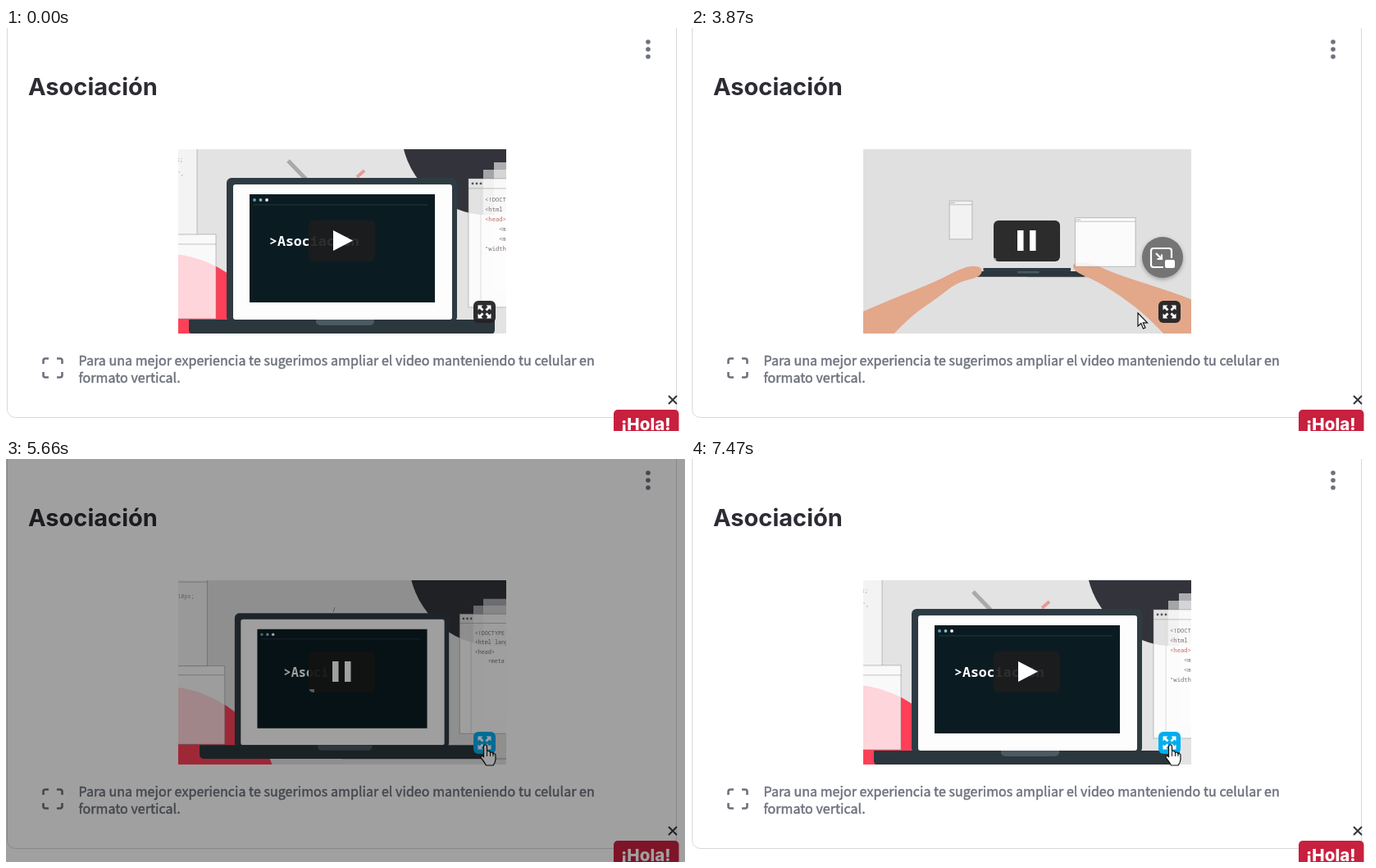
An HTML page with a canvas for the animation above (8 s loop, 828x492 px).

```html
<!DOCTYPE html>
<html lang="es">
<head>
<meta charset="utf-8">
<style>
html, body { margin: 0; width: 828px; height: 492px; overflow: hidden; background: #fff; }
svg, canvas { position: absolute; left: 0; top: 0; }
</style>
</head>
<body>
<svg width="828" height="492" fill="none">
  <rect x="1.5" y="-20.5" width="816" height="496" rx="10" stroke="#d5d7dc"/>
  <g fill="#6d717d">
    <circle cx="783" cy="17" r="2.800"/><circle cx="783" cy="26" r="2.800"/><circle cx="783" cy="35" r="2.800"/>
    <g font-family="'Noto Sans CJK JP','Noto Sans CJK SC','Noto Sans CJK',sans-serif" font-size="16" font-weight="500" letter-spacing=".050" stroke="#6d717d" stroke-width=".450">
      <text x="88.500" y="412">Para una mejor experiencia te sugerimos ampliar el video manteniendo tu celular en</text>
      <text x="88.500" y="433">formato vertical.</text>
    </g>
  </g>
  <text x="27" y="81.500" fill="#2c2c34" font-family="Inter,sans-serif" font-size="29" font-weight="700">Asociación</text>
  <path d="M45.500 410v-4q0-2.500 2.500-2.500h4M62 403.500h4q2.500 0 2.500 2.500v4M68.500 420v4q0 2.500-2.500 2.500h-4M52 426.500h-4q-2.500 0-2.500-2.500v-4" stroke="#6d717d" stroke-width="2.600"/>
  <path d="M808 449l10 10m0-10l-10 10" stroke="#34343c" stroke-width="2"/>
  <rect x="741" y="466" width="79.500" height="40" rx="5" fill="#c8203f"/>
  <text x="750" y="491" fill="#fff" font-family="Inter,sans-serif" font-size="20.500" font-weight="800">¡Hola!</text>
</svg>
<canvas id="stage" width="828" height="492"></canvas>
<script>
const c = document.getElementById('stage').getContext('2d');
const LOOP = 8000, MONO = '"Noto Sans Mono", monospace';
const BLUE = '#00adef', DARK = 'rgba(29,29,29,.92)', SKIN = '#e3a78a', EDGE = 'rgba(125,125,125,.45)';

const ramp = (t, a, b) => Math.max(0, Math.min(1, (t - a) / (b - a)));
const ease = (t, a, b) => { const u = ramp(t, a, b); return u * u * (3 - 2 * u); };
const mix = (a, b, u) => a + (b - a) * u;

// Value of a keyed track [[time, ...values], ...]
function track(keys, t) {
  const i = keys.findIndex(k => k[0] > t);
  if (i === 0) return keys[0].slice(1);
  if (i < 0) return keys[keys.length - 1].slice(1);
  const a = keys[i - 1], b = keys[i], u = ease(t, a[0], b[0]);
  return a.slice(1).map((v, j) => mix(v, b[j + 1], u));
}

function rect(x, y, w, h, fill, r = 0) {
  c.fillStyle = fill;
  c.beginPath();
  c.roundRect(x, y, w, h, r);
  c.fill();
}
function disc(x, y, r, fill) {
  c.fillStyle = fill;
  c.beginPath();
  c.arc(x, y, r, 0, 7);
  c.fill();
}
function line(x1, y1, x2, y2, color, w) {
  c.strokeStyle = color;
  c.lineWidth = w;
  c.beginPath();
  c.moveTo(x1, y1);
  c.lineTo(x2, y2);
  c.stroke();
}
function text(s, x, y, font, color, align = 'left') {
  c.font = font;
  c.fillStyle = color;
  c.textAlign = align;
  c.fillText(s, x, y);
}
function at(x, y, draw, k = 1) {
  c.save();
  c.translate(x, y);
  c.scale(k, k);
  draw();
  c.restore();
}

// Smooth closed outline through midpoints of flat x,y pairs
function blob(p, fill) {
  const n = p.length / 2, X = i => p[(i % n) * 2], Y = i => p[(i % n) * 2 + 1];
  c.fillStyle = fill;
  c.beginPath();
  c.moveTo((X(0) + X(1)) / 2, (Y(0) + Y(1)) / 2);
  for (let i = 1; i <= n; i++) c.quadraticCurveTo(X(i), Y(i), (X(i) + X(i + 1)) / 2, (Y(i) + Y(i + 1)) / 2);
  c.fill();
}

// Browser window that pops open around its centre
function pane(x, y, w, h, pop, px, alpha) {
  if (pop <= 0) return;
  at(x + w / 2, y + h / 2, () => {
    rect(-w / 2, -h / 2, w, h, `rgba(255,255,255,${alpha})`);
    c.strokeStyle = EDGE;
    c.lineWidth = px;
    c.strokeRect(-w / 2, -h / 2, w, h);
    line(-w / 2, 12 - h / 2, w / 2, 12 - h / 2, EDGE, px);
    for (let i = 0; i < 3; i++) disc(5 + i * 5 - w / 2, 6 - h / 2, 1.4, '#555');
  }, pop);
}

const LEFT_DOWN = [170, 362, 210, 346, 250, 329, 300, 309, 333, 291, 350, 290, 356, 295, 352, 304, 325, 310, 300, 330, 268, 352, 230, 392, 170, 400];
const LEFT_UP = [170, 362, 210, 346, 250, 329, 300, 312, 330, 299, 347, 296, 353, 301, 349, 308, 322, 316, 296, 331, 262, 352, 226, 392, 170, 400];
const RIGHT_DOWN = [650, 352, 610, 334, 560, 317, 515, 303, 490, 291, 470, 289, 465, 295, 471, 303, 495, 313, 525, 331, 556, 355, 590, 392, 650, 400];
const RIGHT_UP = [650, 292, 610, 277, 575, 264, 545, 254, 495, 235, 472, 222, 457, 225, 459, 232, 480, 240, 515, 270, 553, 298, 610, 340, 650, 372];

const CODE = ['<!DOCTYPE html>', '<html lang="es">', '<head>', '<meta charset="utf-8">', '<meta name="viewport"', '"width=device-width"'];

function terminal(s, typed) {
  const k = ramp(s, .918, 1);
  at(0, -87, () => {
    rect(-113, -66, 226, 132, '#0a1c22');
    for (let i = 0; i < 3; i++) disc(-107 + i * 7.5, -59, 1.9, ['#6f9db0', '#8fbccd', '#fff'][i]);
    line(-108, -53, 104, -53, '#26383e', 1);
    text('>Asociación'.slice(0, typed), mix(-76, -89, k), -3, 'bold 16.600px ' + MONO, '#fff');
  }, mix(.983, 1, k));
}

function laptop(open, s, booted, typed) {
  line(0, 18, 250, 18, 'rgba(90,90,90,.5)', 1 / s);
  c.save();
  c.scale(1, open);
  rect(-141, -173, 281, 176, '#2f3b42', 6);
  if (open > .1) {
    rect(-133, -165, 267, 165, '#fdfdfd', 3);
    if (booted) terminal(s, typed);
    else {
      disc(-70, -89, 17, '#15181c');
      text('Complete Web', -42, -91, 'bold 18px Inter, sans-serif', '#15181c');
      text('Engineer', -42, -72, 'bold 18px Inter, sans-serif', '#15181c');
    }
  }
  c.restore();
  rect(-187, 0, 373, 18, '#2b363d', [1, 1, 5, 5]);
  rect(-32, 0, 71, 7, '#4b5961', [0, 0, 5, 5]);
}

function windows(t, s, full) {
  const px = 1 / s, code = '7.200px ' + MONO;
  pane(-250, -226, 73, 123, full ? 1 : ease(t, 3450, 3680), px, .6);
  pane(-322, -104, 168, 103, full ? 1 : ease(t, 4000, 4250), px, .78);
  const lines = full ? 6 : Math.floor(ramp(t, 4300, 5800) * 5.2);
  if (lines > 0) text('padding: 10px;', -194, -193, code, '#999', 'right');
  if (full) text('",', -193, -176, code, '#999', 'right');

  const pop = full ? 1 : ease(t, 3550, 3790), fan = full ? 1 : ramp(t, 4300, 5200);
  if (fan > 0) {
    rect(154 + 31 * fan, -172 - 20 * fan, 194, 157, 'rgba(255,255,255,.6)');
    rect(154 + 18 * fan, -172 - 11 * fan, 194, 157, 'rgba(240,240,240,.6)');
  }
  pane(154, -172, 194, 157, pop, px, .86);
  if (fan > 0) line(169, -160, 169, -15, '#dcdcdc', px);
  for (let i = 0; i < lines; i++) {
    text(CODE[i], i === 3 || i === 4 ? 191 : 174, -144 + i * 12, code, full && i === 2 ? '#c2685f' : '#7d706e');
  }
}

function scene(t, full) {
  const s = full ? 1 : t < 4970 ? mix(.31, .438, ramp(t, 2570, 4970)) : mix(.438, .93, ease(t, 4970, 5560));
  const grow = ramp(s, .47, .9), k = ramp(s, .918, 1);
  const open = full ? 1 : mix(.06, 1, ease(t, 3950, 4450));
  const rise = full ? 0 : 110 * (1 - ease(t, 2640, 3260));
  const leave = ease(t, 4640, 4960) * 260;

  rect(210, 148, 400, 225, full || s > .8 ? '#e3e3e3' : '#e0e0e0');
  disc(mix(600, 589, k), 121, 107.5 * grow, '#33343b');
  disc(190, 420, mix(142, 145, k) * grow, '#fd4058');
  if (full) {
    line(344, 162, 371, 190, '#a9a9a9', 5);
    line(428, 182, 437, 174, '#e59a98', 4);
  } else if (s > .85) line(399, 187, 401, 181, '#999', 1);

  const body = { x: 410, y: 300.4 + (s - .416) * 95 + rise };
  const arm = (a, b) => at(0, rise, () => blob(a.map((v, i) => mix(v, b[i], open)), SKIN));
  const typed = full ? 11 : Math.max(0, Math.floor((t - 5190) / 75));
  at(body.x, body.y, () => laptop(open, s, full || t > 5100, typed), s);
  const hands = !full && leave < 260;
  if (hands) at(leave, leave * .3, () => arm(RIGHT_DOWN, RIGHT_UP));
  at(body.x, body.y, () => windows(t, s, full), s);
  if (hands) at(-leave, leave * .3, () => arm(LEFT_DOWN, LEFT_UP));
}

function playButton(t, playing, hover) {
  rect(369, 235, 81, 50, hover ? BLUE : DARK, 6);
  if (playing) {
    c.save();
    c.beginPath();
    c.roundRect(369, 235, 81, 50, 6);
    c.clip();
    if (t < 2540) {
      rect(369, 281, 81, 4, '#3d6f86');
      const shift = (t - 1740) / 50 % 6;
      for (let x = 360 + shift; x < 456; x += 6) line(x, 286, x + 5, 280, '#2aa3d4', 2);
    } else rect(369, 281, ramp(t, 2570, 5510) * 7, 4, 'rgba(255,255,255,.5)');
    c.restore();
    rect(398, 247, 7.5, 25, '#fff');
    rect(413, 247, 7.5, 25, '#fff');
  } else {
    c.fillStyle = '#fff';
    c.fill(new Path2D('M399 247L423 259.500L399 272Z'));
  }
}

function fullButton(hover) {
  rect(570, 333, 27, 27, hover ? BLUE : 'rgba(35,35,38,.95)', 6);
  for (let i = 0; i < 4; i++) {
    c.save();
    c.translate(583.5, 346.5);
    c.rotate(i * Math.PI / 2);
    c.fillStyle = '#fff';
    c.fill(new Path2D('M8 -8V-2L6 -4L3 -1L1 -3L4 -6L2 -8Z'));
    c.restore();
  }
}

function pipButton() {
  c.save();
  c.shadowColor = 'rgba(0,0,0,.3)';
  c.shadowBlur = 5;
  c.shadowOffsetY = 2;
  disc(575, 280, 25, '#747474');
  c.restore();
  c.strokeStyle = '#fff';
  c.lineWidth = 2.2;
  c.stroke(new Path2D('M576 292H564Q561 292 561 289V272Q561 269 564 269H583Q586 269 586 272V281M567 275L574 282M574 276.500V282H568.500'));
  rect(578, 283, 12, 10, '#fff', 2);
}

const HAND = new Path2D('M-2 2Q-2 0 0 0Q2 0 2 2V8Q5.500 6.500 6 9.500Q9 8 9.500 11Q12.500 10 12.500 13V18Q12 22 9.500 25H1Q-1 21 -5.500 15.500Q-5.500 12 -2 14.500Z');
const ARROW = new Path2D('M0 0V16L3.800 12.600L6.500 19L9 18L6.300 11.800H11.500Z');
const PATH = [[260, 633, 457], [790, 418, 250.5], [2520, 418, 250.5], [3310, 530, 335], [3870, 545, 348],
  [4250, 572, 352], [4560, 593, 353.5], [4970, 592, 354], [5240, 584.5, 349]];

function pointer(x, y, hand) {
  at(x, y, () => {
    const shape = hand ? HAND : ARROW;
    c.fillStyle = '#fff';
    c.strokeStyle = '#111';
    c.lineWidth = 1.2;
    c.fill(shape);
    c.stroke(shape);
    if (hand) for (const i of [2, 6, 9.5]) line(i, 9, i, 14, '#111', 1);
  });
}

function draw(t) {
  c.clearRect(0, 0, 828, 492);
  const [x, y] = track(PATH, t), shown = t >= 260;
  const over = (l, top, w, h) => shown && x >= l && x <= l + w && y >= top && y <= top + h;
  const onPlay = over(369, 235, 81, 50), onFull = over(570, 333, 27, 27);
  const playing = t >= 1740 && t < 6500;

  c.save();
  c.beginPath();
  c.rect(210, 148, 400, 225);
  c.clip();
  scene(t, t < 2570 || t > 6500);
  c.restore();

  playButton(t, playing, onPlay);
  fullButton(onFull);
  if (t >= 2570 && t < 4400 && !onPlay && !onFull) pipButton();
  if (shown) pointer(x, y, onPlay || onFull);
  if ((t >= 1470 && t < 1740) || (t >= 5440 && t < 5600)) disc(x, y, 15, 'rgba(255,225,0,.5)');

  const black = Math.min(ramp(t, 5590, 5780), 1 - ramp(t, 7220, 7470));
  if (black > 0) rect(0, 0, 828, 492, `rgba(0,0,0,${black})`);
}

const start = performance.now();
(function tick() {
  draw((performance.now() - start) % LOOP);
  requestAnimationFrame(tick);
})();
</script>
</body>
</html>
```
